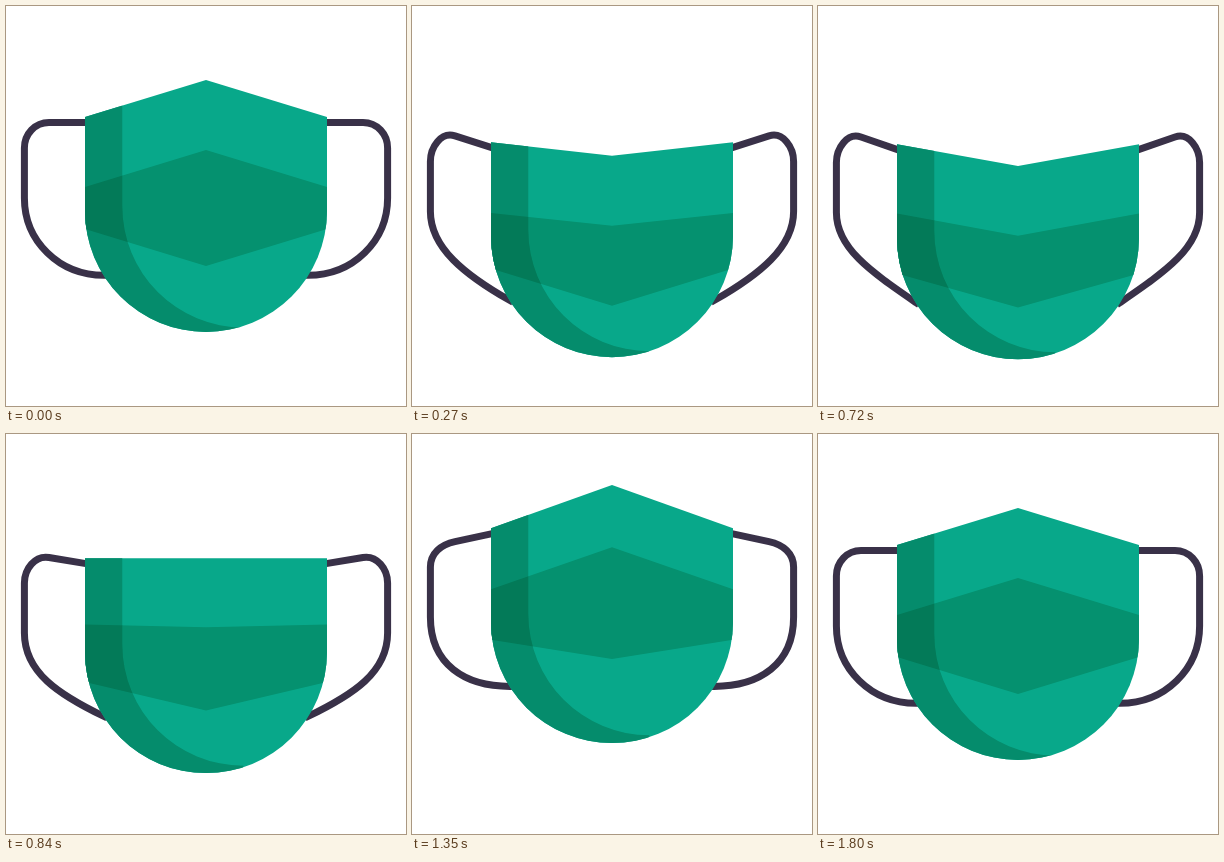
Animation, 400 px wide and 400 px high, one loop 1830 ms. Source, as an HTML page with a canvas:

```html
<!DOCTYPE html>
<html lang="en">
<head>
<meta charset="utf-8">
<title>Breathing mask</title>
<style>
  html, body { margin: 0; width: 100%; height: 100%; overflow: hidden; background: #fff; }
  canvas { display: block; width: 400px; height: 400px; }
</style>
</head>
<body>
<canvas id="stage" width="400" height="400"></canvas>
<script>
const ctx = document.getElementById('stage').getContext('2d');
const STEP = 30, STEPS = 61, END = 60;
const INHALE = 18.5, EXHALE = 40;
const COLORS = { strap: '#393148', cloth: '#08a88a', fold: '#05916f', shade: '#058c6c', deep: '#037a58' };

const mix = (a, b, k) => a + (b - a) * k;
const smooth = t => t * t * (3 - 2 * t);

// rest -> low point -> high point -> rest
function pose(n, rest, low, high, turn = EXHALE) {
  if (n <= INHALE) return mix(rest, low, Math.sin(n / INHALE * Math.PI / 2));
  if (n <= turn) return mix(low, high, smooth((n - INHALE) / (turn - INHALE)));
  return mix(high, rest, smooth((n - turn) / (END - turn)));
}

function fill(path, color) {
  ctx.fillStyle = color;
  ctx.fill(path);
}

function strapPath(n, y) {
  const lag = y * 0.53;
  const bend = pose(n, 0, 1, 0);
  const top = 116.5 + y, corner = 116.5 + lag, end = 269.3 + y;
  const slope = (top - corner) / 37;
  return new Path2D(`M86 ${top + slope * 6} L43 ${corner}
    C29 ${corner - slope * 14} 18.4 ${128 + lag} 18.4 ${142 + lag}
    V${192 + lag}
    C18.4 ${235 + lag / 2} 53 ${end - 37 * bend} 98 ${end} l3 ${2.4 * bend}`);
}

function draw(n) {
  const y = pose(n, 0, 36.5, -20);
  const edge = 111 + y;
  const peak = edge + pose(n, -37, 36, -44.5, 39);
  const foldEdge = edge + pose(n, 70, 71, 59.5);
  const foldPeak = foldEdge + pose(n, -37, 35, -43);
  const hemEdge = edge + pose(n, 112, 132.5, 111.5);
  const hemPeak = edge + pose(n, 149, 170, 127.5);
  const round = 205 + y;
  const inner = y + pose(n, 200.5, 198.2, 196.5);

  ctx.fillStyle = '#fff';
  ctx.fillRect(0, 0, 400, 400);

  const strap = strapPath(n, y);
  ctx.strokeStyle = COLORS.strap;
  ctx.lineWidth = 7;
  for (const side of [1, -1]) {
    ctx.save();
    ctx.translate(200, 0);
    ctx.scale(side, 1);
    ctx.translate(-200, 0);
    ctx.stroke(strap);
    ctx.restore();
  }

  const body = new Path2D(`M79 ${edge} L200 ${peak} L321 ${edge} V${round} A121 121 0 0 1 79 ${round}Z`);
  const fold = new Path2D(`M79 ${foldEdge} L200 ${foldPeak} L321 ${foldEdge} V${hemEdge} L200 ${hemPeak} L79 ${hemEdge}Z`);
  const shade = new Path2D(`M0 0 H116.3 V${inner} A121 121 0 0 0 237.3 ${inner + 121} V400 H0Z`);

  fill(body, COLORS.cloth);
  ctx.save();
  ctx.clip(body);
  fill(fold, COLORS.fold);
  fill(shade, COLORS.shade);
  ctx.clip(shade);
  fill(fold, COLORS.deep);
  ctx.restore();
}

const start = performance.now();
function tick() {
  draw(Math.floor((performance.now() - start) / STEP) % STEPS);
  requestAnimationFrame(tick);
}
tick();
</script>
</body>
</html>
```
